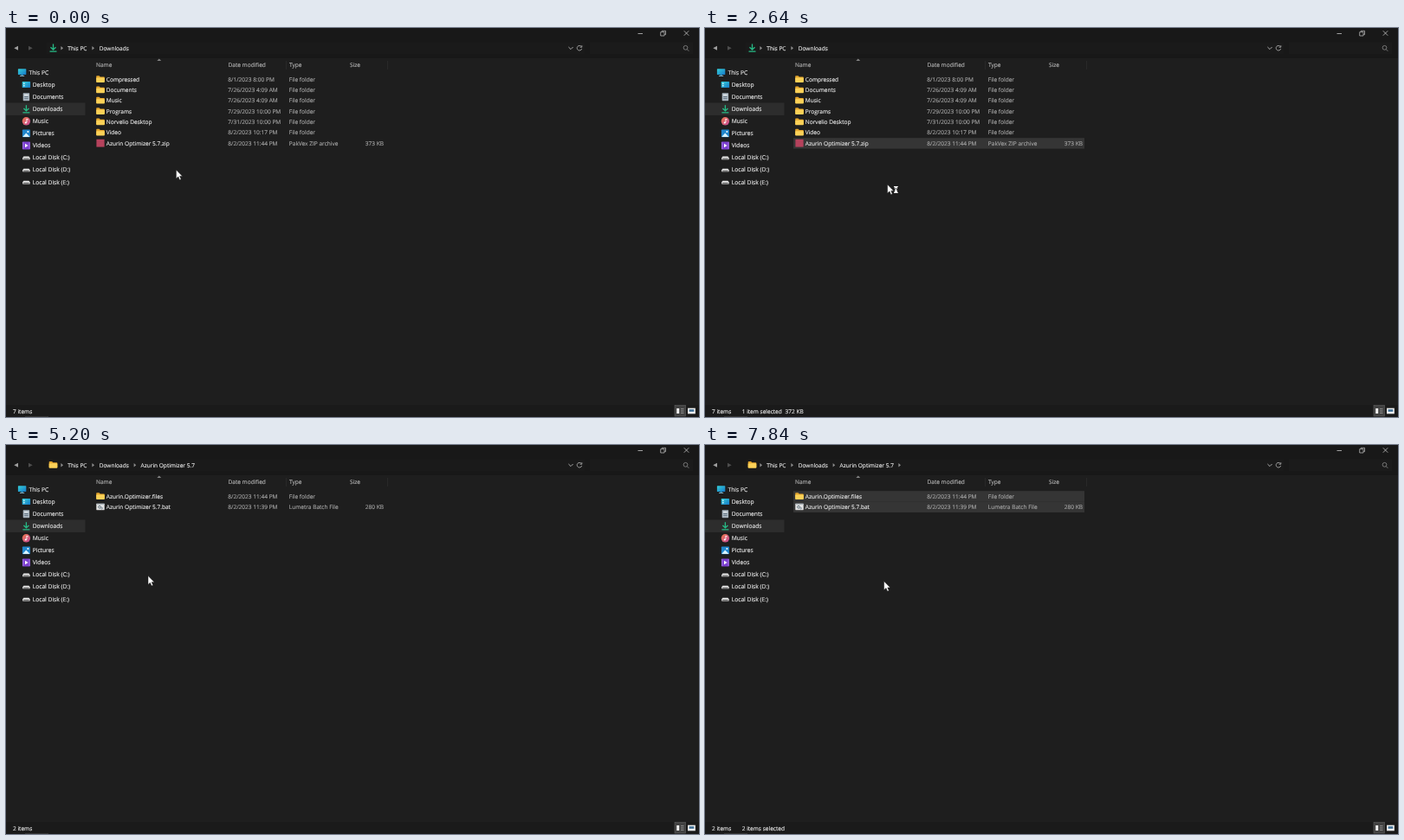
These frames come from a looping animation (800 px wide and 450 px high, 8000 ms). An HTML page:

```html
<!DOCTYPE html>
<html lang="en">
<head>
<meta charset="utf-8">
<title>File manager</title>
<style>
  html, body { margin: 0; width: 100%; height: 100%; overflow: hidden; background: #1e1e1e; }
  svg { display: block; width: 100vw; height: 100vh; }
  text { font: 6.56px "Open Sans", "Noto Sans", sans-serif; fill: #ececec; stroke: #ececec; stroke-width: .14px;
    text-rendering: geometricPrecision; white-space: pre; }
  .dim { fill: #a6a6a6; stroke: #a6a6a6; }
  .head { fill: #b4b4b4; stroke: #b4b4b4; }
  .nav { font-size: 6.7px; }
  .bold { font-weight: 700; stroke: none; }
  .end { text-anchor: end; }
</style>
</head>
<body>
<svg viewBox="0 0 800 450">
  <defs>
    <linearGradient id="screen" x2="1" y2="1">
      <stop stop-color="#35d0d8"/><stop offset="1" stop-color="#1678c8"/>
    </linearGradient>
    <linearGradient id="disc" x2="1" y2="1">
      <stop stop-color="#ef7a4c"/><stop offset="1" stop-color="#c2479a"/>
    </linearGradient>
  </defs>
  <g id="frame"></g>
  <g id="view"></g>
</svg>
<script>
const LOOP = 8000, STEP = 80;
const PITCH = 12.33, FIRST = 59.5;
const ANCHOR = { x: 159.5, y: 153 };

const text = (x, y, s, cls = '') => `<text x="${x}" y="${y + 2.3}" class="${cls}">${s}</text>`;
const rect = (x, y, w, h, fill, more = '') =>
  `<rect x="${x}" y="${y}" width="${w}" height="${h}" fill="${fill}" ${more}/>`;
const path = (d, fill, more = '') => `<path d="${d}" fill="${fill}" ${more}/>`;
const line = (d, color, width = 0.8) => path(d, 'none', `stroke="${color}" stroke-width="${width}"`);
const at = (x, y, s) => `<g transform="translate(${x} ${y})">${s}</g>`;

// Icons are drawn around their own centre.
const icons = {
  folder: path('M-4.8 -3.2q0-.8.8-.8h2.6l1.2 1.2h4.2q.8 0 .8.8v5H-4.8z', '#e3a52d') +
    rect(-4.8, -1.7, 9.6, 5.4, '#fbd158', 'rx=".7"'),
  archive: rect(-4.6, -4.4, 9.2, 8.8, '#b5425c'),
  batch: rect(-4.7, -3.7, 9.4, 7.4, '#e4e4e4', 'rx=".4"') + rect(-4.7, -3.7, 9.4, 1.2, '#a9b2b8') +
    '<circle cx="-1" cy=".2" r="1.4" fill="none" stroke="#60717c"/>' +
    '<circle cx="1.6" cy="1.6" r=".9" fill="none" stroke="#60717c" stroke-width=".7"/>',
  pc: rect(-4.7, -4.3, 9.4, 6.8, 'url(#screen)', 'rx=".6"') + rect(-1, 2.5, 2, 1.2, '#3c93bd') +
    rect(-2.6, 3.6, 5.2, 0.9, '#8fbdd0'),
  desktop: rect(-4.7, -3.5, 9.4, 7, 'url(#screen)', 'rx=".7"') + rect(-3.3, -2, 1.5, 1.5, '#d9f7ff') +
    rect(-3.3, 0.4, 1.5, 1.5, '#d9f7ff'),
  documents: rect(-3.7, -4.5, 7.4, 9, '#a9b5bf', 'rx=".6"') +
    rect(-2.2, -2.7, 4.4, 1.2, '#eef3f6') + rect(-2.2, -0.4, 4.4, 0.8, '#5c6e7c') + rect(-2.2, 1.6, 4.4, 0.8, '#5c6e7c'),
  downloads: line('M0 -4.6V2M-3 -.8L0 2.2L3 -.8M-4 4.1H4', '#27bd87', 1.3),
  music: '<circle r="4.7" fill="url(#disc)"/>' + line('M.5 1.6V-2.7L2.3 -1.7', '#fff', 0.9) +
    '<circle cx="-.6" cy="1.7" r="1.1" fill="#fff"/>',
  pictures: rect(-4.5, -4.3, 9, 8.6, '#2086cc', 'rx=".7"') + path('M-4.2 4L-.2 -.4L4.2 4z', '#d8f3ff') +
    '<circle cx="2" cy="-1.9" r="1" fill="#fff"/>',
  videos: rect(-4.5, -4.5, 9, 9, '#7b3fd0', 'rx=".8"') + path('M-1.4 -2.2L2.2 0L-1.4 2.2z', '#fff') +
    line('M-3.6 -3.8V4M3.6 -3.8V4', '#b58cee', 0.7),
  disk: path('M-3 -1.5H3L4.2 .1V2.2H-4.2V.1z', '#e6e6e6') + rect(-3.2, 0.6, 6.4, 0.9, '#3c3c3c')
};
const icon = (name, x, y) => at(x, y, icons[name]);

const places = [['pc', 'This PC'], ['desktop', 'Desktop'], ['documents', 'Documents'], ['downloads', 'Downloads'],
  ['music', 'Music'], ['pictures', 'Pictures'], ['videos', 'Videos'],
  ['disk', 'Local Disk (C:)'], ['disk', 'Local Disk (D:)'], ['disk', 'Local Disk (E:)']];

const folder = (name, date) => ['folder', name, date, 'File folder', ''];
const downloads = [
  folder('Compressed', '8/1/2023 8:00 PM'),
  folder('Documents', '7/26/2023 4:09 AM'),
  folder('Music', '7/26/2023 4:09 AM'),
  folder('Programs', '7/29/2023 10:00 PM'),
  folder('Norvelio Desktop', '7/31/2023 10:00 PM'),
  folder('Video', '8/2/2023 10:17 PM'),
  ['archive', 'Azurin Optimizer 5.7.zip', '8/2/2023 11:44 PM', 'PakVex ZIP archive', '373 KB']
];
const extracted = folder('Azurin Optimizer 5.7', '8/2/2023 11:44 PM');
const contents = [
  folder('Azurin.Optimizer.files', '8/2/2023 11:44 PM'),
  ['batch', 'Azurin Optimizer 5.7.bat', '8/2/2023 11:39 PM', 'Lumetra Batch File', '280 KB']
];

const menuItems = [[147.3, 'Open'], [160, 'Open with PakVex', 1], [173, 'Extract files...', 1], [185.7, 'Extract Here', 1],
  [198.6, 'Extract to "Azurin Optimizer 5.7\\"', 1], [211.5, 'Open with...'], [228.6, 'Send to'], [245.5, 'Cut'],
  [258.4, 'Copy'], [275.4, 'Create shortcut'], [288.3, 'Delete'], [301.2, 'Rename'], [318.3, 'Properties']];

// Pointer stops: time, x, y.
const stops = [[0, 196.4, 164], [640, 196.4, 164], [960, 185, 138.5], [1600, 185, 138.5], [1840, 176.4, 168],
  [2000, 188, 180], [2080, 188, 180], [2320, 210.6, 181], [4240, 210.6, 181], [4640, 164, 151.3], [5200, 164, 151.3],
  [5520, ANCHOR.x, ANCHOR.y], [5600, ANCHOR.x, ANCHOR.y], [5920, 186, 84], [6000, 186, 84], [6160, 189.5, 62],
  [6560, 189.5, 62], [6720, 189, 67], [6800, 189, 67], [7520, 206.6, 157.6], [LOOP, 206.6, 157.6]];

function pointerAt(t) {
  const i = stops.findIndex(s => s[0] > t);
  const [t0, x0, y0] = stops[i - 1], [t1, x1, y1] = stops[i];
  const u = (t - t0) / (t1 - t0), k = u * u * (3 - 2 * u);
  return { x: x0 + (x1 - x0) * k, y: y0 + (y1 - y0) * k };
}

function drawFrame() {
  let s = rect(0, 0, 800, 450, '#1e1e1e') + rect(0, 0, 800, 35, '#181818') + rect(0, 436, 800, 14, '#1a1a1a');
  s += rect(47, 16.5, 621, 13.5, '#1a1a1a') + rect(674, 16.5, 119, 13.5, '#1b1b1b');
  s += line('M729.5 6.5H735M782.8 3.3L788.2 8.7M788.2 3.3L782.8 8.7', '#c4c4c4');
  s += line('M755.7 4.7H760V9H755.7zM757.2 4.5V3.3H761.5V7.6H760.2', '#c4c4c4', 0.7);
  s += path('M9.3 23.2L14 20.7V25.7z', '#a0a0a0') + path('M30.7 23.2L26 20.7V25.7z', '#4e4e4e');
  s += line('M649.4 22L652 24.6L654.6 22', '#b8b8b8', 0.9);
  s += line('M664.3 21.6A2.8 2.8 0 1 0 664.7 24M664.8 20.2V22.2H662.6', '#b8b8b8');
  s += '<circle cx="784.5" cy="22.8" r="2.4" fill="none" stroke="#8c8c8c" stroke-width=".8"/>' + line('M786.2 24.6L788.3 26.8', '#8c8c8c');
  s += text(71.3, 23.3, 'This PC') + text(107.7, 23.3, 'Downloads');

  s += rect(0, 86.5, 91.5, 14.5, '#2d2d2d');
  places.forEach(([name, label], i) => {
    const y = 51.5 + i * 14.08;
    s += icon(name, i ? 23.4 : 18.6, y) + text(i ? 30.7 : 26.5, y, label, 'nav');
  });

  [[104, 'Name'], [256.5, 'Date modified'], [327, 'Type'], [397, 'Size']].forEach(([x, label]) => s += text(x, 43, label, 'head'));
  s += line('M323.5 38V48M440.5 38V48', '#2c2c2c') + path('M174.4 38L176.8 35.4L179.2 38z', '#858585');

  s += rect(772, 436.5, 12.5, 12.5, '#414141', 'stroke="#606060" stroke-width=".6"');
  s += rect(774.2, 440, 3, 6, '#f0f0f0') + line('M779 440.7H782.5M779 443H782.5M779 445.3H782.5', '#a9a9a9', 0.8);
  s += rect(787, 439.7, 8.8, 6.6, '#f0f0f0') + rect(788.6, 441.2, 5.6, 2.6, '#3f6f96');
  return s + rect(22, 449, 27, 1, '#333');
}

const chevron = x => path(`M${x - 1.2} 21L${x + 1.4} 23.3L${x - 1.2} 25.6z`, '#8f8f8f');

function drawAddress(inside, t) {
  let s = icon(inside ? 'folder' : 'downloads', 54.5, 23) + chevron(64.6) + chevron(100.6);
  if (inside) s += chevron(148.8) + text(155.5, 23.3, 'Azurin Optimizer 5.7');
  if (inside && t >= 5280) s += chevron(224.6);
  return s;
}

function drawRow([kind, name, date, type, size], i, fill) {
  const y = FIRST + i * PITCH;
  return (fill ? rect(102, y - 6.3, 336, PITCH + 0.1, fill) : '') + icon(kind, 109, y - 0.3) + text(115.8, y, name) +
    text(256.3, y, date, 'dim') + text(326.8, y, type, 'dim') + text(436, y, size, 'dim end');
}

function drawMenu(p) {
  let s = '';
  menuItems.forEach(([y, label, marked], i) => {
    if (p.x > 186 && Math.abs(p.y - y) < 6.4) s += rect(187, y - 6.4, 157, 12.8, '#3a3a3a');
    if (marked) s += icon('archive', 192, y - 0.3);
    s += text(201.2, y, label, i ? '' : 'bold');
  });
  s += line('M188 220H343.5M188 237H343.5M188 267H343.5M188 310H343.5', '#3b3b3b');
  return s + line('M338.8 225L342.4 228.5L338.8 232', '#dcdcdc', 0.9);
}

function drawPointer(p, busy) {
  let s = path('M0 0V10.2L2.4 8L4 11.7L5.8 10.9L4.2 7.4H7.3z', '#fff', 'stroke="#111" stroke-width=".5"');
  if (busy) s += path('M7.4 2H12.2V3.1H11.6Q11.6 5 10.4 6Q11.6 7 11.6 8.9H12.2V10H7.4V8.9H8Q8 7 9.2 6Q8 5 8 3.1H7.4z', '#f0f0f0') +
    path('M8.8 4H10.8L9.8 5.4z', '#444');
  return at(p.x, p.y, s);
}

function drawView(t) {
  const p = pointerAt(t), inside = t >= 5200;
  const dragging = t >= 5600 && t < 6240;
  const rows = inside ? contents : t >= 3840 ? [...downloads, extracted] : downloads;
  const hovered = Math.floor((p.y - FIRST + 6.3) / PITCH);

  const isPicked = i => {
    if (inside) return t >= 5680 && (t >= 6160 || p.y < FIRST + i * PITCH + 6);
    return t >= 4960 ? i === 7 : t >= 1120 && i === 6;
  };
  const menuOpen = t >= 1200 && t < 2640;
  let s = drawAddress(inside, t), picked = 0;
  rows.forEach((row, i) => {
    const on = isPicked(i);
    picked += on;
    s += drawRow(row, i, on ? '#353535' : !inside && !menuOpen && i === hovered ? '#2b2b2b' : '');
  });

  s += text(8, 443.6, rows.length + ' items');
  if (picked) s += text(42.7, 443.6, `${picked} item${picked > 1 ? 's' : ''} selected`);
  if (picked && !inside && t < 4960) s += text(92.5, 443.6, '372 KB');

  if (menuOpen) s += drawMenu(p);
  if (dragging) s += rect(ANCHOR.x, p.y, Math.max(0, p.x - ANCHOR.x), Math.max(0, ANCHOR.y - p.y), '#2166a8',
    'fill-opacity=".6" stroke="#2b6399" stroke-width=".7"');
  return s + drawPointer(p, t >= 2640 && t < 3760);
}

const view = document.getElementById('view');
document.getElementById('frame').innerHTML = drawFrame();
const start = performance.now();
let shown = -1;

function update() {
  const t = Math.floor(((performance.now() - start) % LOOP) / STEP) * STEP;
  if (t !== shown) view.innerHTML = drawView(shown = t);
  requestAnimationFrame(update);
}
update();
</script>
</body>
</html>
```
